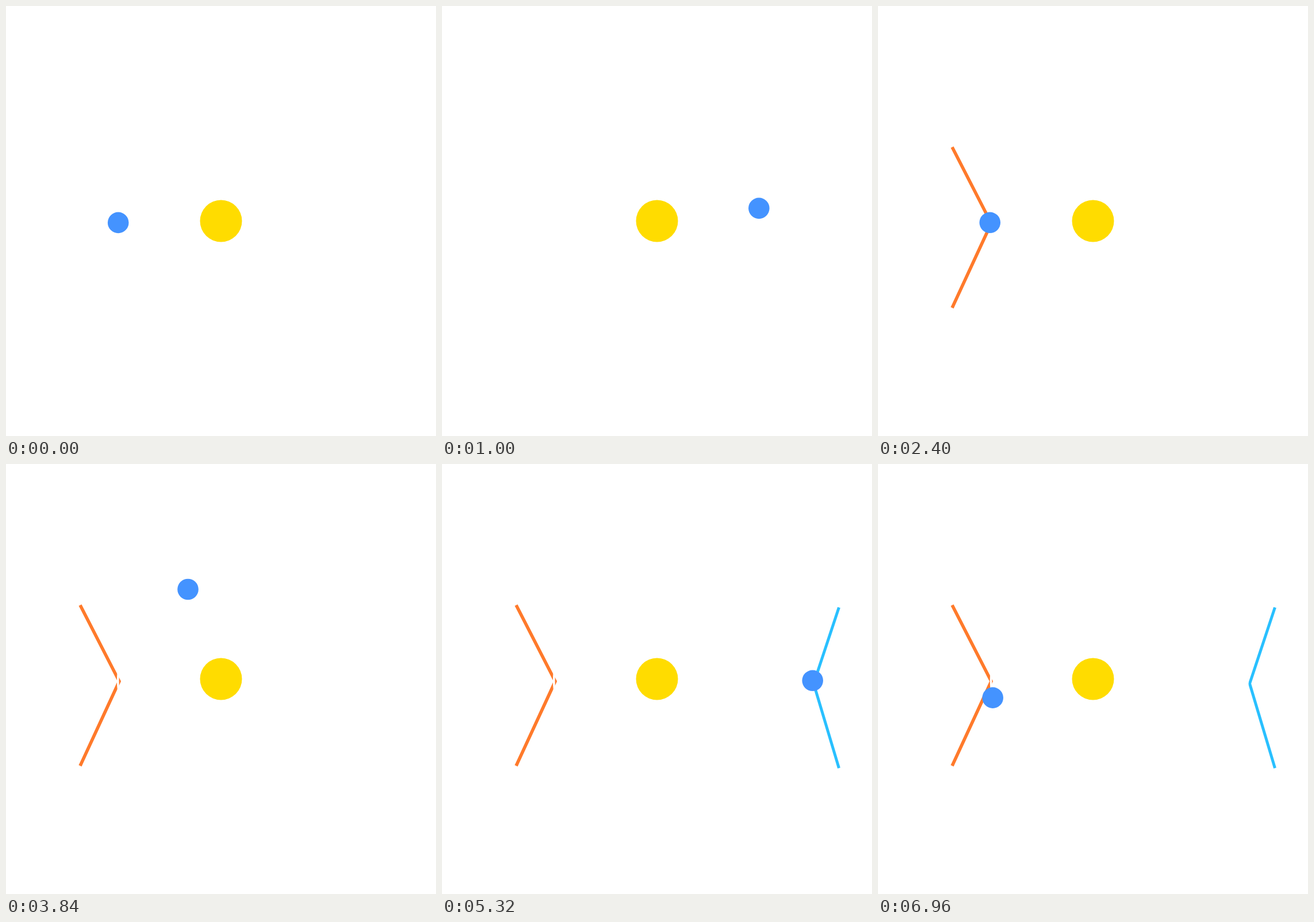
Animation of 748 by 748 pixels, one loop 7000 ms. Source, as an HTML page:

```html
<!DOCTYPE html>
<html lang="en">
<head>
<meta charset="utf-8">
<title>Orbit</title>
<style>
  html, body { margin: 0; width: 100%; height: 100%; overflow: hidden; background: #fff; }
  svg { display: block; width: 100%; height: 100%; }
</style>
</head>
<body>
<svg viewBox="0 0 748 748">
  <circle cx="374" cy="374" r="36.5" fill="#ffdc00"/>
  <g fill="none" stroke-miterlimit="10">
    <path id="left" d="M129 245.5 L197 378 L129 525" stroke="#ff7a2b" stroke-width="5.6"/>
    <path id="right" d="M690.5 249.5 L646.5 382 L690.5 529" stroke="#29c0ff" stroke-width="5"/>
    <ellipse id="track" stroke="#fff" stroke-width="3.6"/>
  </g>
  <circle id="planet" r="18.3" fill="#4493ff"/>
</svg>
<script>
const LOOP = 7000;
const [left, right, track, planet] =
  ['left', 'right', 'track', 'planet'].map(id => document.getElementById(id));

const round = { cx: 374.2, cy: 377.5, rx: 179, ry: 179 };
const wide = { cx: 419.7, cy: 376.8, rx: 225, ry: 178.7 };
const narrowed = { ...wide, rx: 223.2 };

const settle = u => u + 0.095 * u * (1 - u);
const surge = u => u + 0.027 * Math.sin(2 * Math.PI * u);

// Each leg is half a turn, clockwise from the left end.
const legs = [
  { start: 0, duration: 1054, ease: settle },
  { start: 1054, duration: 1024, ease: settle },
  { start: 3520, duration: 990, ease: surge },
  { start: 6023, duration: 983, ease: surge }
];
const endOf = leg => leg.start + leg.duration;
const leftAt = endOf(legs[1]);
const rightAt = endOf(legs[2]);
const narrowAt = 6500;

const clamp = u => Math.min(1, Math.max(0, u));
const halfTurns = t => legs.reduce(
  (sum, { start, duration, ease }) => sum + ease(clamp((t - start) / duration)), 0);

function place(node, attributes) {
  for (const name in attributes) node.setAttribute(name, attributes[name]);
}

function render(t) {
  const orbit = t < leftAt ? round : t < narrowAt ? wide : narrowed;
  const angle = Math.PI * halfTurns(t);
  place(track, orbit);
  place(planet, {
    cx: orbit.cx - orbit.rx * Math.cos(angle),
    cy: orbit.cy - orbit.ry * Math.sin(angle)
  });
  left.style.display = t < leftAt ? 'none' : '';
  right.style.display = t < rightAt ? 'none' : '';
}

const start = performance.now();
function tick(now) {
  render(Math.max(0, now - start) % LOOP);
  requestAnimationFrame(tick);
}
render(0);
requestAnimationFrame(tick);
</script>
</body>
</html>
```
